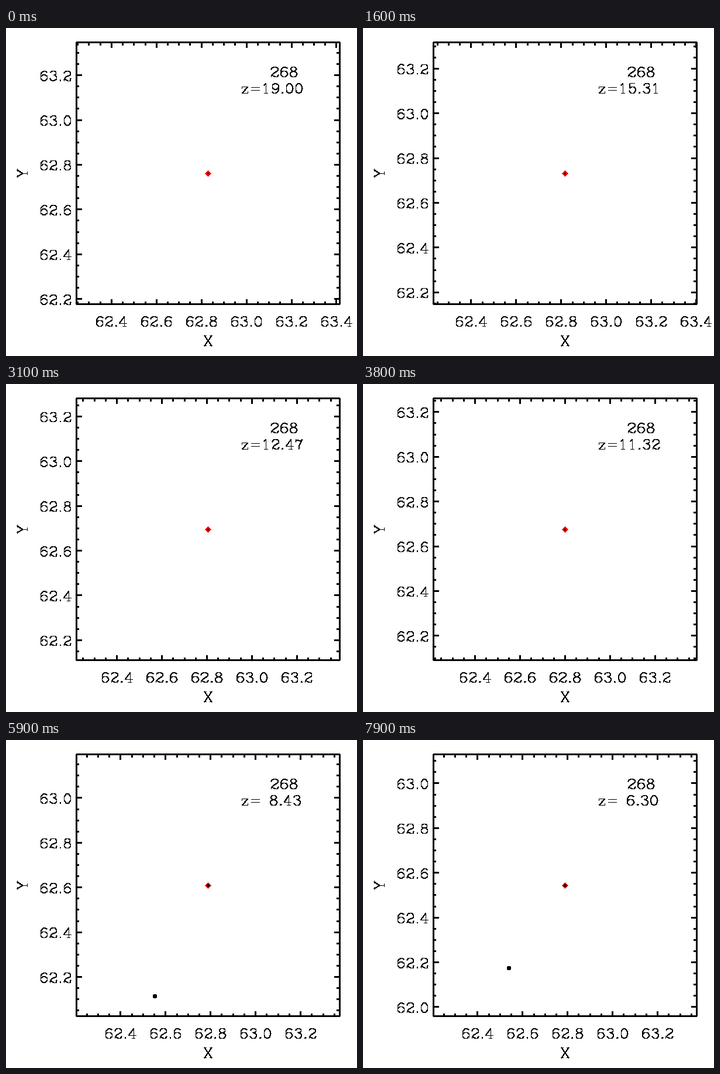
Animation of 600x560 px, one loop 8 s. Source, as a matplotlib script:

```python
import numpy as np
import matplotlib.pyplot as plt
from matplotlib.animation import FuncAnimation
from matplotlib.collections import LineCollection
from matplotlib.patches import Circle, Polygon, Rectangle

W, H, DPI = 600, 560, 100
FRAMES, STEP = 80, 100
PX = 72 / DPI                                # one pixel in points
LEFT, RIGHT, TOP, BOTTOM = 120, 570, 24, 471
MID_X, MID_Y = (LEFT + RIGHT) / 2, (TOP + BOTTOM) / 2
HALF = 0.585                                 # half of the visible range
UNIT_X = (RIGHT - LEFT) / (2 * HALF)
UNIT_Y = (BOTTOM - TOP) / (2 * HALF)
SCALE = 0.8                                  # pixels per glyph unit


def curve(steps, values, degree):
    return np.poly1d(np.polyfit(steps, values, degree))


# motion of the view centre, the redshift and the companion
KEYS = [0, 8, 24, 38, 48, 59, 79]
LOG_Z = np.log1p([19.00, 17.05, 13.73, 11.32, 9.85, 8.43, 6.30])
centre_x = curve(KEYS, [62.8294, 62.8237, 62.811, 62.8, 62.7935, 62.789, 62.789], 4)
centre_y = curve(KEYS, [62.763, 62.7497, 62.715, 62.6767, 62.648, 62.6105, 62.5457], 4)
mate_x = curve([48, 59, 79], [255, 254, 249], 2)
mate_y = curve([48, 59, 79], [460, 437, 389], 2)


# stroke font: x around the glyph centre, y up from the baseline
def line(*v):
    return np.array(v, float).reshape(-1, 2)


def arc(x, y, rx, ry, start=0, end=360):
    t = np.radians(np.linspace(start, end, int(abs(end - start) / 24) + 2))
    return np.column_stack([x + rx * np.cos(t), y + ry * np.sin(t)])


def bars(y, *spans):
    """Horizontal strokes at one height, each from a to b."""
    return [line(a, y, b, y) for a, b in spans]


six = [arc(0, 6.5, 7, 6.5), np.vstack([line(-7, 6.5), arc(1, 10.5, 8, 10.5, 180, 50)])]
glyphs = {
    ' ': [],
    '.': [arc(0, 1, 1, 1)],
    '=': bars(12, (-9, 9)) + bars(6, (-9, 9)),
    '0': [arc(0, 10.5, 7, 10.5)],
    '1': [line(-4, 17, 0, 21, 0, 0)] + bars(0, (-4, 4)),
    '2': [np.vstack([arc(0, 15.5, 7, 5.5, 170, -40), line(-3, 8, -7, 3, -7, 0)]),
          line(-7, 2, -4, 3, 1, 0, 5, 0, 7, 4)],
    '3': [arc(0, 16.5, 6, 4.5, 160, -90), arc(0, 6, 7, 6, 90, -160)],
    '4': [line(3, 0, 3, 21, -8, 6, 8, 6)] + bars(0, (-1, 6)),
    '5': [line(5, 21, -5, 21, -6, 11), arc(0, 7, 7, 7, 145, -160)],
    '6': six,
    '7': [line(-7, 15, -7, 21), line(-7, 18, -4, 20, 3, 18, 7, 21, 1, 9, 0, 0)],
    '8': [arc(0, 16.5, 6, 4.5), arc(0, 6, 7, 6)],
    '9': [(0, 21) - s for s in six],
    'z': [line(-6, 10, -6, 14, 6, 14, -6, 0, 6, 0, 6, 4)],
    'X': [line(-7, 21, 7, 0), line(7, 21, -7, 0)]
         + bars(21, (-9, -4), (4, 9)) + bars(0, (-9, -4), (4, 9)),
    'Y': [line(-7, 21, 0, 10, 0, 0), line(7, 21, 0, 10)]
         + bars(21, (-9, -4), (4, 9)) + bars(0, (-3, 3)),
}
ADVANCE = {'.': 10, '=': 26, 'z': 18, ' ': 16}


def write(text, x, y, align=0.0, upright=True):
    """Strokes of a text in pixels; align 0 left, 0.5 centre, 1 right."""
    widths = [ADVANCE.get(c, 20) for c in text]
    pen = -align * sum(widths)
    out = []
    for c, w in zip(text, widths):
        for s in glyphs[c]:
            u, v = (s + (pen + w / 2, 0)).T * SCALE
            pts = np.column_stack([x + u, y - v] if upright else [x - v, y - u])
            out.append(np.floor(pts + 0.5) + 0.5)
        pen += w
    return out


def ticks(mid):
    """Value, length share and label (majors only) of each tick in range."""
    lo, hi = np.ceil((mid - HALF) / 0.05), np.floor((mid + HALF) / 0.05)
    for i in np.arange(lo, hi + 1):
        major = i % 4 == 0
        yield i * 0.05, 0.02 if major else 0.01, '%.1f' % (i * 0.05) if major else ''


fig = plt.figure(figsize=(W / DPI, H / DPI), dpi=DPI, facecolor='white')
ax = fig.add_axes([0, 0, 1, 1])
ax.set_xlim(0, W)
ax.set_ylim(H, 0)
ax.axis('off')


def line_set(width, cap):
    lines = LineCollection([], colors='black', linewidths=width * PX, antialiaseds=False,
                           capstyle=cap, zorder=4)
    lines.set_snap(False)
    return ax.add_collection(lines, autolim=False)


rules = line_set(3, 'butt')
letters = line_set(0.85, 'projecting')

cx, cy, r = 345.5, 248.5, 5
flat = dict(ec='none', antialiased=False)
ax.add_patch(Polygon([(cx - r, cy), (cx, cy - r), (cx + r, cy), (cx, cy + r)],
                     fc='#ff0000', zorder=2, **flat))
core = ax.add_patch(Circle((cx, cy), 1, fc='black', zorder=3, **flat))
mate = ax.add_patch(Circle((0, 0), 3, fc='black', zorder=3, **flat))
mate.set_clip_path(Rectangle((LEFT, TOP), RIGHT - LEFT, BOTTOM - TOP, transform=ax.transData))

frame = ([[(LEFT, y + 0.5), (RIGHT + 1, y + 0.5)] for y in (TOP, BOTTOM)]
         + [[(x + 0.5, TOP), (x + 0.5, BOTTOM + 1)] for x in (LEFT, RIGHT)])
titles = (write('X', MID_X, 542, 0.5) + write('Y', 36, MID_Y, 0.5, upright=False)
          + write('268', 451, 83))


def draw(n):
    mx, my = centre_x(n), centre_y(n)
    z = np.expm1(np.interp(n, KEYS, LOG_Z))
    marks = list(frame)
    text = titles + write('z=%5.2f' % z, 401, 111)

    for value, share, label in ticks(mx):
        x = MID_X + (value - mx) * UNIT_X
        px = np.floor(x + 0.5) + 0.5
        size = share * (BOTTOM - TOP)
        marks += [[(px, BOTTOM), (px, BOTTOM - np.floor(size))],
                  [(px, TOP), (px, TOP + 1 + np.ceil(size))]]
        text = text + write(label, x, 509, 0.5)

    for value, share, label in ticks(my):
        y = MID_Y - (value - my) * UNIT_Y
        py = np.floor(y) + 0.5
        size = share * (RIGHT - LEFT)
        marks += [[(LEFT, py), (LEFT + 1 + np.floor(size), py)],
                  [(RIGHT, py), (RIGHT - np.ceil(size), py)]]
        # end labels stay within the height of the box
        text = text + write(label, 112.5, np.clip(y + 9, 42, 472), 1)

    rules.set_segments(marks)
    letters.set_segments(text)
    core.set_radius(0.7 + 1.2 * n / FRAMES)
    mate.set_center((mate_x(n) + 0.5, mate_y(n) + 0.5))
    mate.set_visible(bool(mate_y(n) <= BOTTOM))
    return rules, letters, core, mate


anim = FuncAnimation(fig, draw, frames=FRAMES, interval=STEP, repeat=True, repeat_delay=0)
plt.show()
```
